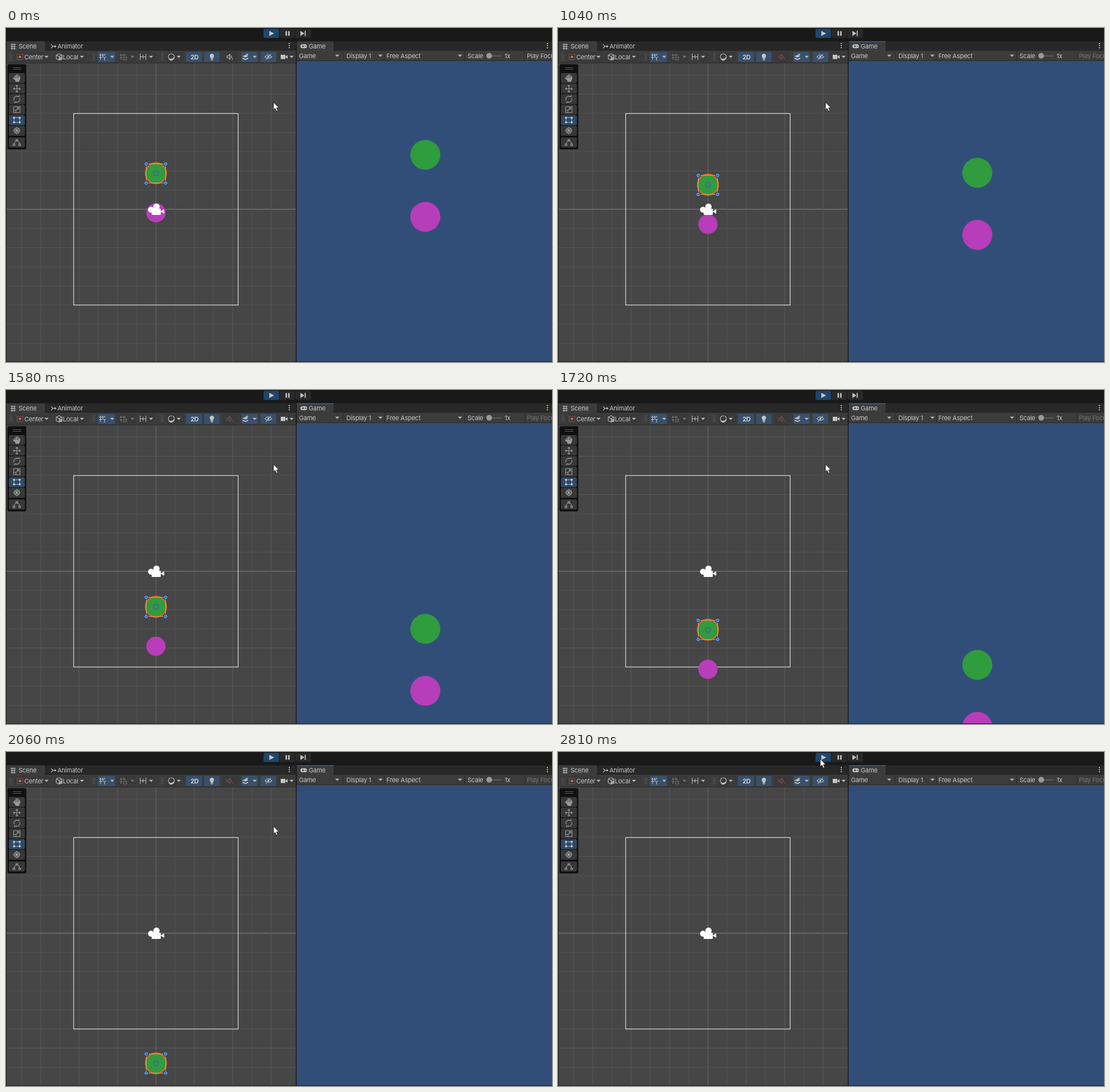
Animation, 956 px wide and 586 px high, one loop 4560 ms. Source, as an HTML page:

```html
<!DOCTYPE html>
<html lang="en">
<head>
<meta charset="utf-8">
<title>Falling balls</title>
<style>
html, body { margin: 0; width: 100%; height: 100%; overflow: hidden; background: #191919; }
svg { display: block; width: 956px; height: 586px; }
text { font: 11px Inter, "Open Sans", sans-serif; letter-spacing: -.25px; fill: #c6c6c6; }
.dim { fill: #747474; }
.line { fill: none; stroke: #bdbdbd; stroke-width: 1.1; }
.solid { fill: #c4c4c4; }
.tool { fill: none; stroke: #9a9a9a; stroke-width: 1.1; }
.red { stroke: #8a4c4e; }
.grip { stroke: #555; }
</style>
</head>
<body>
<svg viewBox="0 0 956 586" xmlns="http://www.w3.org/2000/svg">
  <defs>
    <clipPath id="sceneClip"><rect x="1" y="62" width="506.5" height="523"/></clipPath>
    <clipPath id="gameClip"><rect x="509" y="58" width="447" height="527"/></clipPath>
    <path id="drop" d="M-3.7-1.8h7.4L0 2.2z" fill="#b4b4b4"/>
    <g id="knob">
      <circle r="3.5" fill="#2f73cf" stroke="#1b2a40" stroke-width="1"/>
      <circle r="2.7" fill="none" stroke="#8db9ea" stroke-width=".9"/>
    </g>
    <g id="dots" fill="#c4c4c4">
      <circle cy="-3.6" r="1.1"/><circle r="1.1"/><circle cy="3.6" r="1.1"/>
    </g>
  </defs>

  <rect width="956" height="586" fill="#191919"/>

  <!-- play controls -->
  <rect x="451" y="1.5" width="27" height="16" rx="2" fill="#20466a"/>
  <rect x="479" y="1.5" width="27" height="16" fill="#292929"/>
  <rect x="507" y="1.5" width="27" height="16" rx="2" fill="#292929"/>
  <g class="solid">
    <path d="M461 5l8.5 4.5L461 14z"/>
    <path d="M489.500 5.500h2.600v8h-2.600zM494 5.500h2.600v8H494z"/>
    <path d="M515.500 5l7 4.500-7 4.500zM523 5h1.700v9H523z"/>
  </g>

  <!-- tabs and bars -->
  <rect x="1" y="23.500" width="506.500" height="17" fill="#282828"/>
  <rect x="1" y="23.500" width="67" height="17" fill="#3c3c3c"/>
  <rect x="1" y="40" width="506.500" height="21.500" fill="#3c3c3c"/>
  <rect x="509" y="23.500" width="447" height="17" fill="#282828"/>
  <rect x="509" y="23.500" width="64.500" height="17" fill="#3c3c3c"/>
  <rect x="509" y="40" width="447" height="17.500" fill="#3c3c3c"/>
  <rect id="focusLine" x="509" y="23.300" width="64.500" height="1.700" fill="#2f5f8e"/>

  <path class="line" d="M8 29h9M8 32.500h9M8 36h9M10.500 27v11M14.500 27v11"/>
  <text x="22" y="36">Scene</text>
  <path class="line" d="M79 29l3.500 3.200L79 35.500M82.500 32.200H86"/>
  <path class="solid" d="M85 29.800l3.500 2.400-3.500 2.400z"/>
  <text x="90" y="36">Animator</text>
  <use href="#dots" x="496" y="31"/>
  <rect x="515.500" y="28.500" width="11.500" height="7" rx="3.500" class="solid"/>
  <path d="M518 32h4M520 30v4" stroke="#333"/>
  <circle cx="524.300" cy="32" r="1" fill="#333"/>
  <text x="530" y="36">Game</text>
  <use href="#dots" x="948" y="31"/>

  <text x="513" y="52.500">Game</text>
  <use href="#drop" x="580" y="48.500"/>
  <text x="596" y="52.500">Display 1</text>
  <use href="#drop" x="655.500" y="48.500"/>
  <text x="666" y="52.500">Free Aspect</text>
  <use href="#drop" x="795" y="48.500"/>
  <text x="808" y="52.500">Scale</text>
  <path d="M846 49h21.500" stroke="#666" stroke-width="1.500"/>
  <circle cx="846" cy="48.800" r="5" fill="#999"/>
  <text x="873" y="52.500">1x</text>
  <path d="M590.500 41v16M662.500 41v16M803.500 41v16M908.500 41v16" stroke="#2c2c2c"/>
  <text id="playMode" x="912" y="52.500">Play Focused</text>

  <g id="bar"></g>

  <!-- scene view -->
  <g clip-path="url(#sceneClip)">
    <rect x="1" y="62" width="507" height="523" fill="#464646"/>
    <g id="grid"></g>
    <rect x="118.500" y="150" width="288" height="336" fill="none" stroke="#e2e2e2" stroke-width="1.150"/>
    <g id="sceneBalls">
      <circle cx="262.500" cy="324.200" r="16.900" fill="#b83dba"/>
      <circle cx="262.500" cy="254.800" r="18.200" fill="#2f9c3e" stroke="#ee6416" stroke-width="2.200"/>
    </g>
    <g fill="#fff">
      <circle cx="254" cy="318.700" r="5.300"/>
      <circle cx="263.500" cy="313.400" r="5.500"/>
      <rect x="255" y="317" width="16" height="11" rx="1.500"/>
      <path d="M270.500 322l6.500-4v8z"/>
    </g>
    <g id="handles">
      <rect x="245.500" y="238.400" width="34" height="33.500" fill="none" stroke="#e9a06c" stroke-width="1"/>
      <circle cx="262.700" cy="254.800" r="4.300" fill="none" stroke="#3e6f80" stroke-width="2.300"/>
      <use href="#knob" x="245.500" y="238.400"/>
      <use href="#knob" x="279.500" y="238.400"/>
      <use href="#knob" x="245.500" y="271.900"/>
      <use href="#knob" x="279.500" y="271.900"/>
    </g>
  </g>

  <!-- tool strip -->
  <rect x="2.500" y="63.500" width="33" height="149.500" rx="3" fill="#101010"/>
  <path d="M12 69.500h15M12 72.500h15" stroke="#5c5c5c"/>
  <g id="tools"></g>
  <g class="tool">
    <path d="M15 90l-2-2.500M15.500 89v-4.500M18 87v-5M20.500 87v-5M23 88v-4" stroke-width="1.700" stroke-linecap="round"/>
    <path d="M15 88h8.500l1.300-1-2.300 7h-5z" fill="#9a9a9a"/>
    <path d="M13 106.500h12M19 100.500v12M15 104.500l-2 2 2 2M23 104.500l2 2-2 2M17 102.500l2-2 2 2M17 110.500l2 2 2-2"/>
    <path d="M14 127a5.500 5.500 0 0 1 8-6.500M24 123a5.500 5.500 0 0 1-8 6.500M19.500 120.500h3.500v-3M18.500 129.500H15v3"/>
    <path d="M13.500 138h11v10.500h-11zM13.500 144.500h4v4M18 144l4-4M19 139.800h3.200v3.200"/>
    <path d="M14 157.500h10v8H14z" stroke="#c8d4e0" stroke-dasharray="2 1"/>
    <path d="M12.500 156h3v3h-3zM22.500 156h3v3h-3zM12.500 164h3v3h-3zM22.500 164h3v3h-3z" fill="#c8d4e0" stroke="none"/>
    <circle cx="19" cy="180" r="4.800"/>
    <path d="M12.500 180h13M19 173.500v13M15 176l8 8M23 176l-8 8"/>
    <path d="M14 204.500q1-6 5-7 4 1 5 7M17.500 195.500h3v3h-3zM12.500 203.500h3v3h-3zM22.500 203.500h3v3h-3z"/>
  </g>

  <!-- game view -->
  <g clip-path="url(#gameClip)">
    <rect x="509" y="58" width="447" height="527" fill="#314e79"/>
    <g id="gameBalls">
      <circle cx="734.200" cy="331.300" r="26.300" fill="#b83dba"/>
      <circle cx="734.200" cy="222.500" r="26.300" fill="#2f9c3e"/>
    </g>
  </g>

  <path id="cursor" d="M0 0v13.400l3-2.800 2.200 5 2.300-1-2.200-4.800h4.200z" fill="#fff" stroke="#161616" stroke-width=".8"/>
</svg>

<script>
const $ = id => document.getElementById(id);
const box = (x, y, w, h, fill) =>
  `<rect x="${x}" y="${y}" width="${w}" height="${h}" rx="2" fill="${fill}"/>`;
const icon = (d, cls = "line") => `<path class="${cls}" d="${d}"/>`;
const drop = x => `<use href="#drop" x="${x}" y="50.5"/>`;

// scene toolbar: left edge, width, active, contents
const BLUE = "#38506c", GREY = "#393939";
const buttons = [
  [15, 63, 0, `<rect x="19.500" y="46" width="10" height="9.500" class="line red"/>
    <circle cx="24.500" cy="50.700" r="2" fill="#d08068"/><text x="32" y="54.500">Center</text>${drop(71)}`],
  [84, 57, 0, icon("M88 47.500l5-2.500 5 2.500v6.500l-5 2.500-5-2.500zM88 47.500l5 2.500 5-2.500M93 50v6.500") +
    `<circle cx="96" cy="53.500" r="2.800" fill="#a8a8a8"/><text x="99.500" y="54.500">Local</text>${drop(133)}`],
  [161, 30, 1, icon("M163 47.500h10M163 51.500h6M165.500 45v11M169.500 45v6M173 45v3M170.500 50.500l2 2.500 2-2.500M172.500 53v4") + drop(186)],
  [196, 31, 0, `<g opacity=".45">${icon("M199 47.500h11M199 52.500h5M201.500 45v11M206.500 45v4M206 51h5v5h-5z")}${drop(221.5)}</g>`],
  [232, 30, 0, icon("M235 45v11M245 45v11M240 47v7M235 50.500h10") + drop(254)],
  [281, 30, 0, `<circle cx="289.500" cy="50.500" r="5.300" class="line"/>` + icon("M285 53a6 6 0 0 0 9-2 5 5 0 0 1-8 5z", "solid") + drop(302.5)],
  [315, 28, 1, `<text x="323" y="54.500" style="font-weight:600;fill:#ddd">2D</text>`],
  [347, 27, 1, icon("M360.500 45a4 4 0 0 1 2.200 7.200v2.300h-4.400v-2.300a4 4 0 0 1 2.200-7.200zM358.700 55.300h3.600v1.500h-3.600z", "solid")],
  [379, 27, 0, `<g id="mute">${icon("M387 49h2l3-3v9l-3-3h-2zM394 48.500q2 2 0 4.500M396.500 52.500v3")}</g>`],
  [412, 29, 1, icon("M414 49.500l5-2.200 5 2.200-5 2.200zM414 52l5 2.200 5-2.200v2l-5 2.300-5-2.300zM422 44l.8 2 2 .8-2 .8-.8 2-.8-2-2-.8 2-.8z", "solid") + drop(435.5)],
  [446, 27, 1, icon("M453.500 50.500q6-7 12 0-6 6-12 0zM455 56l9-10.500") + `<circle cx="459.500" cy="50.300" r="1.700" class="solid"/>`],
  [478, 29, 0, icon("M481 47h8v7.500h-8zM489.500 50l3.500-2.500v6.500l-3.500-2.500z", "solid") + drop(500)]
];
$("bar").innerHTML =
  buttons.map(([x, w, on, inner]) => box(x, 42, w, 17.5, on ? BLUE : GREY) + inner).join("") +
  [7.5, 152.5, 272.5].map(x => icon(`M${x} 44v13M${x + 2.5} 44v13`, "grip")).join("");

$("tools").innerHTML = [79, 97.5, 116, 134.5, 153, 171.5, 192]
  .map((y, i) => box(5, y, 28, 17.6, i === 4 ? "#304a66" : "#383838")).join("");

const CELL = 33.62;
let grid = "";
for (let i = -8; i <= 8; i++) {
  const x = 262.5 + i * CELL, y = 318 + i * CELL;
  const tone = i % 2 ? "#525252" : "#595959";
  grid += `<path d="M${x} 62V585" stroke="${i ? tone : "#686868"}"/>`;
  grid += `<path d="M1 ${y}H508" stroke="${i ? tone : "#858585"}"/>`;
}
$("grid").innerHTML = grid;

const LOOP = 4560, FOCUS = 450, FALL = 780, MOVE = 2400;
const GAME_SCALE = 1.567;
const move = (id, x, y) => $(id).setAttribute("transform", `translate(${x} ${y})`);

function fall(t) {
  if (t < FALL) return 0;
  const n = Math.floor((t - FALL) / 67.2 + .15);
  return n ? (.839 * n + 1.13) ** 2 : .7;
}

function draw(t) {
  const d = fall(t);
  move("sceneBalls", 0, d);
  move("handles", 0, d);
  move("gameBalls", 0, d * GAME_SCALE);

  const focused = t >= FOCUS;
  $("focusLine").style.display = focused ? "" : "none";
  $("playMode").classList.toggle("dim", focused);
  $("mute").firstElementChild.classList.toggle("red", focused);

  const k = t < MOVE ? 0 : Math.min(1, (Math.floor((t - MOVE) / 68) + 1) / 7);
  const e = k * k * (3 - 2 * k);
  move("cursor", 468.3 - 9.1 * e, 130.3 - 118 * e);
}

const start = performance.now();
function tick() {
  draw((performance.now() - start) % LOOP);
  requestAnimationFrame(tick);
}
tick();
</script>
</body>
</html>
```
